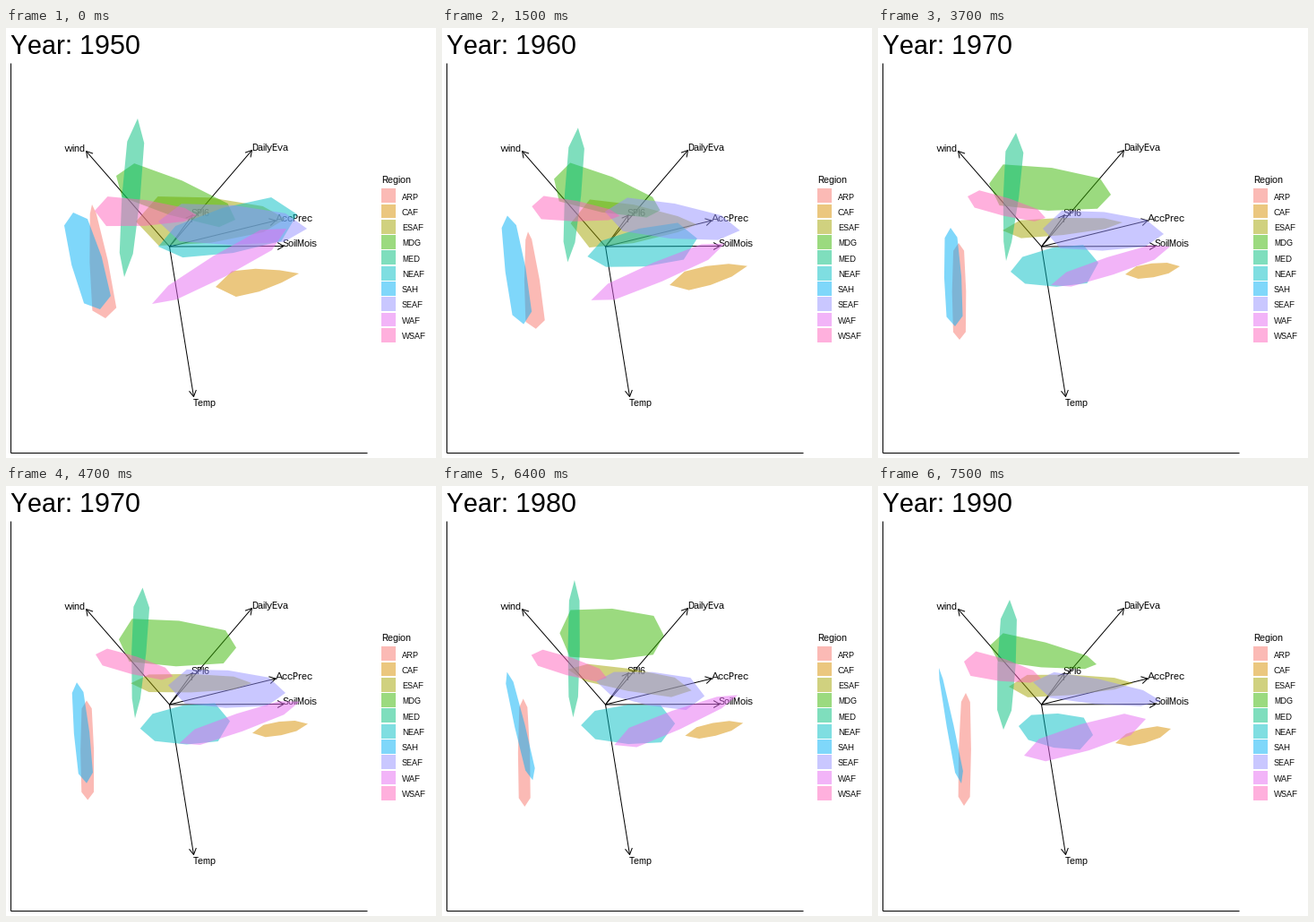
Animation of 480 by 480 pixels, one loop 8000 ms. Source, as a matplotlib script:

```python
import numpy as np
import matplotlib.pyplot as plt
from matplotlib.animation import FuncAnimation
from matplotlib.patches import Polygon, Rectangle

SIZE, DPI = 480, 80
PT = 72 / DPI  # points per pixel
FRAMES, INTERVAL = 80, 100
FIRST_YEAR, YEAR_STEP = 1950, 10
PERIOD, LAST_STILL = 19, 6  # frames per decade, last still frame of the first
KEY_TOP, KEY_PITCH = 179.3, 17.28

plt.rcParams.update({
    "font.family": ["Liberation Sans", "DejaVu Sans"],
    "text.hinting": "native",
    "text.hinting_factor": 1,
    "text.kerning_factor": 6,
})

fig = plt.figure(figsize=(SIZE / DPI, SIZE / DPI), dpi=DPI, facecolor="white")
ax = fig.add_axes([0, 0, 1, 1])
ax.set(xlim=(0, SIZE), ylim=(SIZE, 0))
ax.axis("off")


def label(x, y, text, px):
    return ax.text(x, y, text, fontsize=px * PT, va="baseline", ha="left", zorder=2)


def line(xs, ys):
    ax.plot(xs, ys, color="black", lw=PT, solid_capstyle="butt", zorder=1)


def arrow(tip, origin=(182.5, 244), head=8):
    (x0, y0), (x1, y1) = origin, tip
    line([x0, x1], [y0, y1])
    barbs = np.arctan2(y1 - y0, x1 - x0) + np.pi + np.radians([30, -30])
    bx, by = x1 + head * np.cos(barbs), y1 + head * np.sin(barbs)
    line([bx[0], x1, bx[1]], [by[0], y1, by[1]])


def blob(x0, y0, x1, y1, w0, w1, shoulder):
    """Outline around a spine, w0 and w1 wide at its two shoulders."""
    start, end = np.array([x0, y0]), np.array([x1, y1])
    spine = end - start
    side = np.array([spine[1], -spine[0]]) / np.hypot(*spine) / 2
    at = np.array([shoulder, 0.5, 1 - shoulder])[:, None]
    width = np.array([w0, 0.6 * (w0 + w1), w1])[:, None]
    middle = start + at * spine
    return np.vstack([start, middle + width * side, end,
                      (middle - width * side)[::-1]])


class Region:
    def __init__(self, name, color, shoulder, *spines):
        self.name, self.color = name, color
        self.shapes = [blob(*s, shoulder) for s in spines]
        self.patch = ax.add_patch(Polygon(self.shapes[0], facecolor=color, alpha=0.5,
                                          linewidth=0, zorder=3))

    def show(self, decade, progress):
        a, b = self.shapes[decade], self.shapes[min(decade + 1, len(self.shapes) - 1)]
        self.patch.set_xy(a + (b - a) * progress)


# One spine per decade: start point, end point, width near each end
regions = [
    Region("ARP", "#F8766D", 0.08,
           (96, 197, 111, 324, 7, 27), (96, 241, 102, 341, 7, 19),
           (90, 240, 91, 348, 12, 14), (90, 238, 92, 358, 9, 13),
           (98, 231, 96, 357, 10, 13)),
    Region("CAF", "#D89000", 0.22,
           (234, 289, 327, 274, 29, 14), (263, 286, 347, 262, 18, 15),
           (276, 275, 337, 266, 14, 12), (272, 278, 337, 264, 13, 11),
           (265, 287, 327, 271, 14, 13)),
    Region("ESAF", "#A3A500", 0.15,
           (145, 216, 312, 213, 55, 29), (143, 219, 272, 222, 53, 13),
           (139, 226, 273, 217, 20, 12), (140, 203, 278, 229, 19, 23),
           (146, 224, 285, 220, 25, 13)),
    Region("MDG", "#39B600", 0.1,
           (123, 165, 256, 214, 40, 28), (126, 170, 238, 199, 47, 22),
           (124, 174, 260, 186, 46, 34), (132, 163, 248, 164, 54, 46),
           (125, 178, 244, 199, 32, 15)),
    Region("MED", "#00BF7D", 0.15,
           (147, 101, 132, 278, 19, 15), (154, 116, 144, 254, 17, 12),
           (154, 117, 143, 260, 20, 9), (148, 103, 147, 257, 11, 10),
           (147, 127, 140, 272, 18, 16)),
    Region("NEAF", "#00BFC4", 0.15,
           (170, 244, 325, 208, 36, 50), (159, 260, 267, 247, 27, 38),
           (148, 272, 246, 262, 30, 43), (155, 267, 262, 264, 32, 42),
           (157, 268, 240, 278, 28, 36)),
    Region("SAH", "#00B0F6", 0.1,
           (75, 206, 105, 314, 27, 31), (72, 211, 85, 338, 12, 18),
           (81, 223, 86, 333, 14, 18), (73, 208, 102, 328, 9, 11),
           (68, 203, 93, 332, 4, 9)),
    Region("SEAF", "#9590FF", 0.15,
           (170, 216, 336, 224, 42, 32), (187, 200, 331, 227, 36, 26),
           (184, 224, 319, 230, 42, 30), (172, 218, 291, 234, 26, 38),
           (173, 219, 316, 240, 29, 18)),
    Region("WAF", "#E76BF3", 0.15,
           (163, 308, 313, 224, 18, 26), (168, 302, 317, 248, 20, 16),
           (193, 287, 326, 244, 17, 17), (195, 288, 333, 231, 23, 13),
           (163, 301, 299, 260, 26, 25)),
    Region("WSAF", "#FF62BC", 0.12,
           (99, 204, 213, 209, 33, 15), (101, 197, 192, 210, 23, 11),
           (100, 188, 187, 212, 20, 14), (100, 188, 184, 214, 18, 15),
           (96, 196, 182, 215, 28, 14)),
]

line([5, 5], [39, 474])
line([5, 403], [474, 474])

for tip in [(89.5, 137.5), (274.5, 136.5), (301, 215), (310, 243.5), (209.5, 411.5),
            (208, 209)]:
    arrow(tip)
for x, y, text in [(65, 138, "wind"), (274, 137, "DailyEva"), (301, 216, "AccPrec"),
                   (309, 244, "SoilMois"), (209, 422, "Temp"), (207, 210, "SPI6")]:
    label(x, y, text, 11)

label(419, 173, "Region", 11)
for i, region in enumerate(regions):
    top = KEY_TOP + KEY_PITCH * i
    ax.add_patch(Rectangle((419, top), 16, 15.86, facecolor=region.color, alpha=0.5,
                           linewidth=0))
    label(442, round(top + 12.2), region.name, 9)

title = label(5, 29, "", 30)


def locate(frame):
    """Current decade and the linear progress towards the next one."""
    decade, phase = divmod(frame, PERIOD)
    steps = 13 if decade == 0 else 12
    # Later moves start one frame into their period
    step = phase - LAST_STILL
    return decade, min(max(step / steps, 0), 1)


def update(frame):
    decade, progress = locate(frame)
    for region in regions:
        region.show(decade, progress)
    title.set_text(f"Year: {FIRST_YEAR + YEAR_STEP * (decade + (progress > 0.5))}")
    return [title] + [r.patch for r in regions]


anim = FuncAnimation(fig, update, frames=FRAMES, interval=INTERVAL, repeat=True,
                     repeat_delay=0)
plt.show()
```
